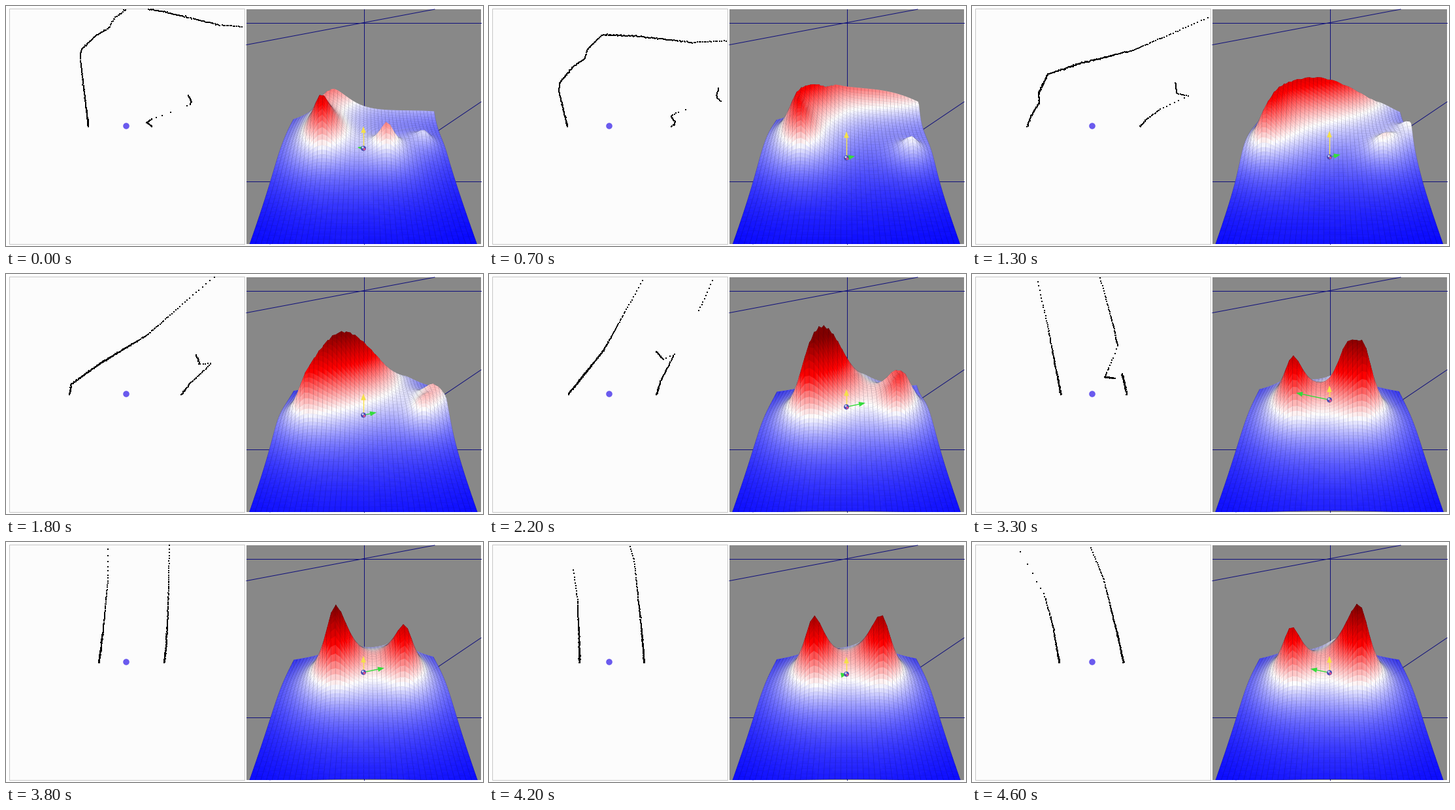
Write a matplotlib script that moves like this. It is 730 by 368 pixels and loops after 4700 ms.

```python
import numpy as np
import matplotlib.pyplot as plt
from matplotlib.animation import FuncAnimation
from matplotlib.collections import PolyCollection
from matplotlib.patches import Circle, Polygon, Rectangle

W, H, DPI = 730, 368, 100
FRAMES, STEP = 47, 100
PX = 72 / DPI
ROBOT = np.array([184.0, 184.0])

# One fixed map: the robot drives through it and every view follows
LEFT_WALL = [(-52, 52), (-78, -54), (-77, -67), (-57, -91), (-39, -104),
             (-34, -119), (-11, -141), (41, -139), (126, -129), (260, -136),
             (332, -142), (380, -151), (460, -186)]
RIGHT_WALL = [(460, -78), (395, -58), (297, -43), (242, -36), (211, -34),
              (167, -60), (163, -44), (178, -34), (132, -30), (106, -23),
              (93, -16), (100, -7), (98, -2), (42, 27), (36, 33), (45, 39)]

# Route: time, x, y, turn of the map in degrees, sideways push
ROUTE = np.array([
    (0, 6, 43, 7, -9),
    (700, 0, 0, 0, 13),
    (1800, 46, -76, -38, 20),
    (2600, 101, -94, -78, 38),
    (3300, 143, -82, -98, -51),
    (3800, 207, -91, -80, 32),
    (4600, 270, -86, -95, -29),
], float)

ANGLES = np.radians(np.arange(0, 180.1, 0.5))
RAYS = np.column_stack([np.cos(ANGLES), -np.sin(ANGLES)])


def route(t):
    return [np.interp(t, ROUTE[:, 0], col) for col in ROUTE.T[1:]]


def cross(a, b):
    return a[..., 0] * b[..., 1] - a[..., 1] * b[..., 0]


def scan(t):
    """Nearest wall hit along each ray, relative to the robot."""
    x, y, turn, _ = route(t)
    c, s = np.cos(np.radians(turn)), np.sin(np.radians(turn))
    reach = np.full(len(RAYS), np.inf)
    d = RAYS[:, None]
    for wall in (LEFT_WALL, RIGHT_WALL):
        seen = (np.array(wall) - (x, y)) @ np.array([[c, s], [-s, c]])
        a, e = seen[None, :-1], np.diff(seen, axis=0)[None]
        den = cross(d, e)
        den = np.where(np.abs(den) < 1e-9, 1e-9, den)
        r, u = cross(a, e) / den, cross(a, d) / den
        ok = (u >= 0) & (u <= 1) & (r > 0)
        reach = np.minimum(reach, np.where(ok, r, np.inf).min(axis=1))
    reach += np.random.default_rng(int(t) + 1).normal(0, 0.5, len(reach))
    hit = np.isfinite(reach)
    return RAYS[hit] * reach[hit, None]


# Height field: each hit adds a bump with a long tail
CELLS, HALF = 40, 131
SPREAD, FALLOFF, TAIL = 18, 1.6, 8
MEAN_PEAK = 141
NODES = np.linspace(-HALF, HALF, CELLS + 1)


def field(hits):
    dx2 = (NODES[:, None] - hits[:, 0]) ** 2
    dy2 = (NODES[:, None] - hits[:, 1]) ** 2
    d2 = dy2[:, None, :] + dx2[None, :, :]
    return (1 / (1 + (d2 / SPREAD ** 2) ** (FALLOFF / 2))).sum(axis=2)


GAIN = (MEAN_PEAK + TAIL) / np.mean([field(scan(t)).max() for t in ROUTE[:, 0]])

FINE = np.linspace(-1, 1, 2 * CELLS + 1)
WIDTH = 1 / (0.003798 - 0.000941 * FINE[:, None])


def refine(z):
    out = np.empty((2 * CELLS + 1,) * 2)
    out[::2, ::2] = z
    out[1::2, ::2] = (z[1:] + z[:-1]) / 2
    out[:, 1::2] = (out[:, :-2:2] + out[:, 2::2]) / 2
    return out


def project(h):
    x = 547 + FINE * WIDTH / 2 * (1 + 0.0008 * h)
    y = -89.9 + 1.317 * WIDTH - h * WIDTH / 263
    return np.stack([x, y], axis=-1)


CMAP = plt.get_cmap("seismic")
N_QUAD, N_LINE = 4 * CELLS, 2 * CELLS + 1


def surface(h, p):
    """Polygons from back to front: per row the quads, then the grid lines."""
    quads = np.stack([p[:-1, :-1], p[:-1, 1:], p[1:, 1:], p[1:, :-1]], axis=2)
    mid = quads.mean(axis=2, keepdims=True)
    quads = (mid + (quads - mid) * 1.15).reshape(CELLS, N_QUAD, 4, 2)
    g = p[::2, ::2]
    down = np.stack([g[:-1], g[1:], g[1:], g[1:]], axis=2)
    over = np.stack([g[1:, :-1], g[1:, 1:], g[1:, 1:], g[1:, 1:]], axis=2)
    polys = np.concatenate([quads, down, over], axis=1).reshape(-1, 4, 2)

    mean = (h[:-1, :-1] + h[:-1, 1:] + h[1:, 1:] + h[1:, :-1]) / 4
    faces = np.zeros((CELLS, N_QUAD + N_LINE, 4))
    tint = CMAP(np.clip(0.25 + mean / 200, 0.25, 1))
    faces[:, :N_QUAD] = tint.reshape(CELLS, N_QUAD, 4)
    return polys, faces.reshape(-1, 4)


def arrow_head(tip, way, length=10, half=3.8):
    way = np.array(way, float) / (np.hypot(*way) + 1e-6)
    base = np.array(tip) - way * length
    side = np.array([-way[1], way[0]]) * half
    return [tip, base + side, base - side]


fig = plt.figure(figsize=(W / DPI, H / DPI), dpi=DPI, facecolor="white")
ax = fig.add_axes([0, 0, 1, 1])
ax.set(xlim=(0, W), ylim=(H, 0))
ax.axis("off")

ax.add_patch(Rectangle((4.5, 3.5), 360, 361, fc="#fcfcfc", ec="#c6c6c6", lw=PX))
ax.add_patch(Circle(ROBOT, 4.8, fc="#6a5aee", lw=0, zorder=3))
dots = ax.scatter([], [], s=(2.6 * PX) ** 2, c="black", marker="s", lw=0, zorder=4)

view = Rectangle((368, 5), 359, 360, fc="#888888", lw=0)
ax.add_patch(view)
for xs, ys in [((547.5, 547.5), (5, 365)), ((368, 727), (25.5, 25.5)),
               ((368, 727), (268.5, 268.5)), ((368, 656), (59.5, 5)),
               ((727, 404), (147, 365))]:
    ax.plot(xs, ys, color="#10107c", lw=PX, zorder=2, clip_path=view)

row_lw = np.r_[np.zeros(N_QUAD), np.full(N_LINE, 0.7 * PX)]
row_ec = np.zeros((N_QUAD + N_LINE, 4))
row_ec[N_QUAD:] = (0, 0, 0.1, 0.24)
mesh = PolyCollection(np.zeros((1, 4, 2)), zorder=5,
                      linewidths=np.tile(row_lw, CELLS),
                      edgecolors=np.tile(row_ec, (CELLS, 1)))
ax.add_collection(mesh, autolim=False)
mesh.set_clip_path(view)


def make_arrow(color):
    line, = ax.plot([], [], color=color, lw=1.4 * PX, zorder=6)
    head = ax.add_patch(Polygon(np.zeros((3, 2)), fc=color, lw=0, zorder=7))
    return line, head


def set_arrow(arrow, start, way):
    line, head = arrow
    tip = np.add(start, way)
    line.set_data(*zip(start, tip - 0.2 * np.array(way)))
    head.set_xy(arrow_head(tip, way))


up_arrow, side_arrow = make_arrow("#f4e04a"), make_arrow("#35dc3c")
ball = [(ax.add_patch(Circle((0, 0), r, fc=c, lw=0, zorder=8)), dx, dy)
        for r, c, dx, dy in [(4, "#4a4cb4", 0, 0), (1.8, "#d8508c", 1.4, 1.2),
                             (1.5, "#c8dcf4", -1, -1.4)]]


def draw(i):
    t = i * STEP
    hits = scan(t)
    xy = np.round(hits + ROBOT)
    inside = (xy[:, 0] > 4) & (xy[:, 0] < 364) & (xy[:, 1] > 3)
    dots.set_offsets(xy[inside] + 0.5)

    h = refine(field(hits) * GAIN - TAIL)
    p = project(h)
    polys, faces = surface(h, p)
    mesh.set_verts(polys)
    mesh.set_facecolor(faces)

    # The robot rides on the surface; its upright arrow shortens as it climbs
    x, y = 547, p[CELLS, CELLS, 1]
    push = route(t)[3]
    set_arrow(up_arrow, (x, y), (0, -max(52 - 0.47 * h[CELLS, CELLS], 10)))
    set_arrow(side_arrow, (x, y), (push, -0.21 * abs(push)))
    for patch, dx, dy in ball:
        patch.center = (x + dx, y + dy)
    return [dots, mesh, *up_arrow, *side_arrow]


anim = FuncAnimation(fig, draw, frames=FRAMES, interval=STEP,
                     repeat=True, repeat_delay=0, blit=False)
plt.show()
```
